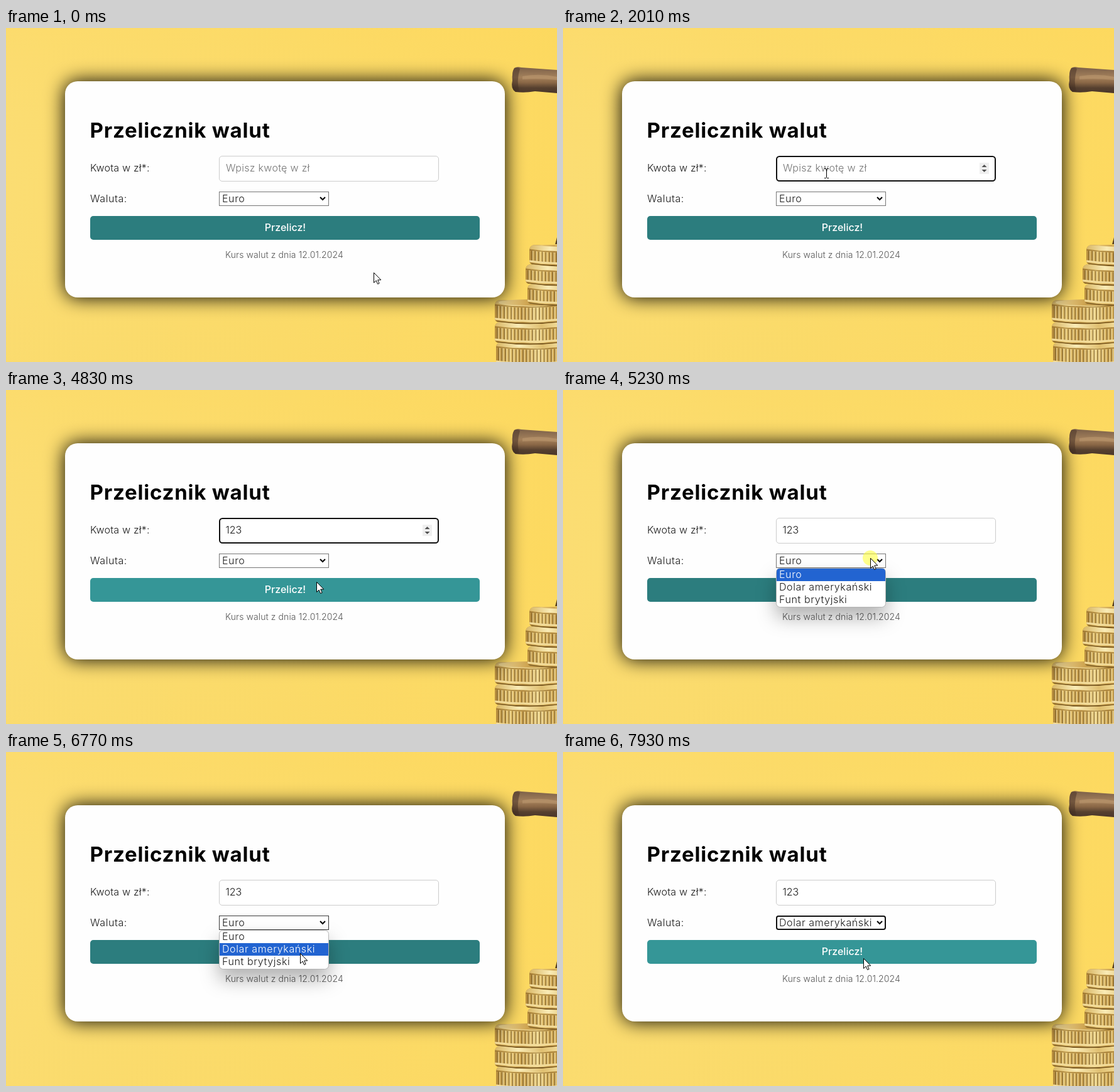
An HTML page with a canvas for the animation above (8 s loop, 877 by 533 pixels).

```html
<!DOCTYPE html>
<html lang="pl">
<head>
<meta charset="utf-8">
<title>Przelicznik walut</title>
<style>
html, body { margin: 0; width: 100%; height: 100%; overflow: hidden; }
canvas, svg { position: absolute; left: 0; top: 0; }
text { font: 350 16px Montserrat, Inter, sans-serif; fill: #1a1a1a; white-space: pre; }
.title { font-size: 33px; font-weight: 700; letter-spacing: .8px; fill: #000; }
.label { letter-spacing: .2px; }
.option { letter-spacing: .6px; }
.option.active { fill: #fff; }
.hint { fill: #757575; letter-spacing: .3px; }
.button { fill: #fff; font-weight: 500; }
.date { font-size: 14px; fill: #555; letter-spacing: .1px; }
#panel { filter: drop-shadow(0 16px 15px rgba(0, 0, 0, .3)); }
</style>
</head>
<body>
<canvas id="photo" width="877" height="533"></canvas>
<svg width="877" height="533" viewBox="0 0 877 533">
  <text class="title" x="133.5" y="175">Przelicznik walut</text>
  <text class="label" x="134" y="229">Kwota w zł*:</text>
  <text class="label" x="134" y="278" style="letter-spacing:.6px">Waluta:</text>

  <rect id="field" fill="#fff"/>
  <text id="hint" class="hint" x="350" y="229">Wpisz kwotę w zł</text>
  <text id="amount" x="349.5" y="229"></text>
  <rect id="caret" y="215" width="1" height="19"/>
  <g id="spinner">
    <rect x="663" y="215" width="15" height="18" fill="#efefef"/>
    <path d="M666.5 222l4-4 4 4zM666.5 226l4 4 4-4z" fill="#505050"/>
  </g>

  <rect id="select" fill="#fff"/>
  <text id="choice" class="option" x="344" y="278"></text>
  <path d="M500 270l4 4 4-4" fill="none" stroke="#000" stroke-width="2"/>

  <rect id="button" x="134" y="300" width="620" height="38" rx="5"/>
  <text class="button" x="444.5" y="324" text-anchor="middle">Przelicz!</text>
  <text class="date" x="349" y="367">Kurs walut z dnia 12.01.2024</text>

  <g id="popup">
    <rect id="panel" x="339.5" y="284.5" width="174" height="62" rx="6" fill="#fff" stroke="#b4b4b4"/>
    <path id="bar" fill="#2264d1"/>
    <text class="option" x="344" y="300">Euro</text>
    <text class="option" x="344" y="320">Dolar amerykański</text>
    <text class="option" x="344" y="340">Funt brytyjski</text>
  </g>

  <circle id="click" r="12" fill="#ffff40" fill-opacity=".6"/>
  <path id="arrow" d="M.5 .5V16.5L4.2 13 6.6 18.6 9.1 17.5 6.7 12H11.8Z" fill="#fff" stroke="#000"/>
  <path id="beam" d="M-3.5 -7.5H-1L0 -6.5 1 -7.5H3.5M0 -6.5V6.5M-3.5 7.5H-1L0 6.5 1 7.5H3.5" fill="none" stroke="#000"/>
</svg>
<script>
const LOOP = 8000;
const el = id => document.getElementById(id);
const ctx = el('photo').getContext('2d');

function gradient(x0, y0, x1, y1, ...colors) {
  const g = ctx.createLinearGradient(x0, y0, x1, y1);
  colors.forEach((c, i) => g.addColorStop(i / (colors.length - 1), c));
  return g;
}

function fillPath(d, style) {
  ctx.fillStyle = style;
  ctx.fill(new Path2D(d));
}

// A coin seen from the side: a ridged band between two bright rims.
function coin(left, top, width, height) {
  const right = left + width, mid = left + width / 2, sag = 7;
  const bottom = top + height - 4;
  const arc = y => `M${left} ${y}Q${mid} ${y + sag} ${right} ${y}`;
  const body = new Path2D(`M${left + 7} ${top}H${right - 7}Q${right} ${top + 2} ${right} ${top + 9}V${bottom - 6}` +
    `Q${right} ${bottom} ${right - 7} ${bottom}Q${mid} ${bottom + sag} ${left + 7} ${bottom}` +
    `Q${left} ${bottom} ${left} ${bottom - 6}V${top + 9}Q${left} ${top + 2} ${left + 7} ${top}Z`);
  ctx.save();
  ctx.fillStyle = gradient(left, 0, right, 0, '#b58b3c', '#e6c673', '#cda452', '#efd78e', '#d2aa55', '#e4c477');
  ctx.fill(body);
  ctx.clip(body);
  for (let x = left + 3; x < right; x += 5.6) {
    const u = (x - mid) / (width / 2), y = top + 9 + sag / 2 * (1 - u * u);
    ctx.fillStyle = 'rgba(104,72,20,.6)';
    ctx.fillRect(x, y, 1.8, height - 19);
    ctx.fillStyle = 'rgba(255,242,190,.5)';
    ctx.fillRect(x + 1.8, y, 1.6, height - 19);
  }
  const rim = (y, color, thick) => {
    ctx.strokeStyle = color;
    ctx.lineWidth = thick;
    ctx.stroke(new Path2D(arc(y)));
  };
  rim(top + 3, gradient(left, 0, right, 0, '#d9b765', '#f9ebb6', '#e0bf70', '#f7e6a8'), 7);
  rim(top + 8, 'rgba(128,92,34,.7)', 1.2);
  rim(bottom - 5, '#f3dc9a', 3);
  rim(bottom - 1, '#75531c', 2);
  ctx.restore();
}

function drawPhoto() {
  ctx.fillStyle = gradient(0, 120, 877, 300, '#fbdd73', '#fbdb69', '#fdd95f');
  ctx.fillRect(0, 0, 877, 533);
  ctx.fillStyle = gradient(0, 0, 0, 533, 'rgba(255,215,90,.25)', 'rgba(250,220,115,0)', 'rgba(250,216,104,.3)');
  ctx.fillRect(0, 0, 877, 533);

  // Wooden handle with a cut end
  fillPath('M809 64Q813 61 820 63L877 67V104L842 101Q826 104 811 102Q803 97 806 84Q805 70 809 64Z',
    gradient(0, 62, 0, 104, '#7a5f48', '#8f7052', '#a5815b', '#8a6746', '#56402f', '#4a362a'));
  fillPath('M809 64Q815 62 818 65Q812 84 817 102H811Q803 97 806 84Q805 70 809 64Z', 'rgba(70,48,36,.5)');
  fillPath('M822 77Q850 72 877 78V83Q848 80 822 82Z', 'rgba(196,160,118,.45)');

  coin(780, 501, 112, 40);
  coin(778, 469, 112, 37);
  coin(778, 434, 112, 39);
  ctx.beginPath();
  ctx.ellipse(834, 438, 50, 5, 0, 0, 7);
  ctx.fillStyle = gradient(780, 0, 877, 0, '#f5e0a0', '#cfa653', '#94702f');
  ctx.fill();
  coin(830, 408, 100, 36);
  coin(827, 377, 106, 35);
  coin(833, 346, 98, 35);
  fillPath('M877 334L874 345H877Z', '#5a4120');

  ctx.shadowColor = '#000';
  ctx.shadowBlur = 31;
  ctx.fillStyle = '#fefefe';
  ctx.beginPath();
  ctx.roundRect(94, 85, 700, 345, 20);
  ctx.fill();
}

const smooth = u => u * u * (3 - 2 * u);
const slow = u => 1 - (1 - u) ** 2;
// First change, last change, number of steps, end point, easing.
const START = [585, 390];
const MOVES = [
  [720, 1210, 8, [419, 232], smooth],
  [3940, 4490, 9, [495, 315], smooth],
  [4760, 5160, 7, [489, 268], smooth],
  [5500, 5900, 7, [475, 311], slow],
  [6100, 6300, 4, [466, 331], slow],
  [6700, 6900, 4, [469, 318], slow],
  [7370, 7730, 6, [479, 329], smooth],
  [7930, 7930, 1, [478, 329], slow]
];

function pointer(t) {
  let at = START;
  for (const [begin, end, steps, to, ease] of MOVES) {
    if (t < begin) break;
    const done = t >= end ? 1 : (Math.floor((t - begin) / (end - begin) * (steps - 1)) + 1) / steps;
    const u = ease(done);
    at = at.map((v, i) => Math.round(v + (to[i] - v) * u));
  }
  return at;
}

const within = (t, a, b) => t >= a && t < b;
const inBox = ([x, y], l, tp, r, b) => x >= l && x < r && y >= tp && y < b;
const show = (id, on) => el(id).setAttribute('visibility', on ? 'visible' : 'hidden');
const set = (id, attrs) => Object.entries(attrs).forEach(([k, v]) => el(id).setAttribute(k, v));

function frame(id, x, y, w, h, line, color, rx) {
  set(id, { x: x + line / 2, y: y + line / 2, width: w - line, height: h - line, rx, stroke: color, 'stroke-width': line });
}

const options = [...document.querySelectorAll('#popup .option')];

function render(t) {
  const at = pointer(t);
  const focused = within(t, 1480, 5160);
  const open = within(t, 5160, 7240);
  const chosen = t >= 7240;
  const overField = inBox(at, 339, 204, 689, 245);
  const typed = '123'.slice(0, [2470, 3010, 3410].filter(k => t >= k).length);

  frame('field', 339, 204, 350, 41, focused ? 2 : 1, focused ? '#101010' : '#ccc', 4.5);
  show('hint', !typed);
  el('amount').textContent = typed;
  show('caret', within(t, 1480, 2010) || within(t, 2470, 3940));
  el('caret').setAttribute('x', [350, 356, 365, 373][typed.length]);
  show('spinner', focused || overField);

  frame('select', 339, 261, 175, 23, chosen ? 2 : 1, chosen ? '#101010' : within(t, 5300, 7240) ? '#3a3a3a' : '#767676', chosen ? 3 : 0);
  el('choice').textContent = options[chosen ? 1 : 0].textContent;

  const hover = !open && inBox(at, 134, 300, 754, 338);
  el('button').setAttribute('fill', hover ? '#359697' : '#2c7d7e');

  show('popup', open);
  const row = at[1] < 305 ? 0 : at[1] < 325 ? 1 : 2;
  el('bar').setAttribute('d', [
    'M340 305V290Q340 285 345 285H508Q513 285 513 290V305Z',
    'M340 305H513V325H340Z',
    'M340 325H513V341Q513 346 508 346H345Q340 346 340 341Z'
  ][row]);
  options.forEach((o, i) => o.classList.toggle('active', i === row));

  show('click', within(t, 1480, 1540) || within(t, 5160, 5300) || within(t, 7240, 7310));
  set('click', { cx: at[0], cy: at[1] });
  show('arrow', !overField);
  show('beam', overField);
  el('arrow').setAttribute('transform', `translate(${at})`);
  el('beam').setAttribute('transform', `translate(${at[0] + .5} ${at[1]})`);
}

drawPhoto();
(function tick() {
  render(performance.now() % LOOP);
  requestAnimationFrame(tick);
})();
</script>
</body>
</html>
```
